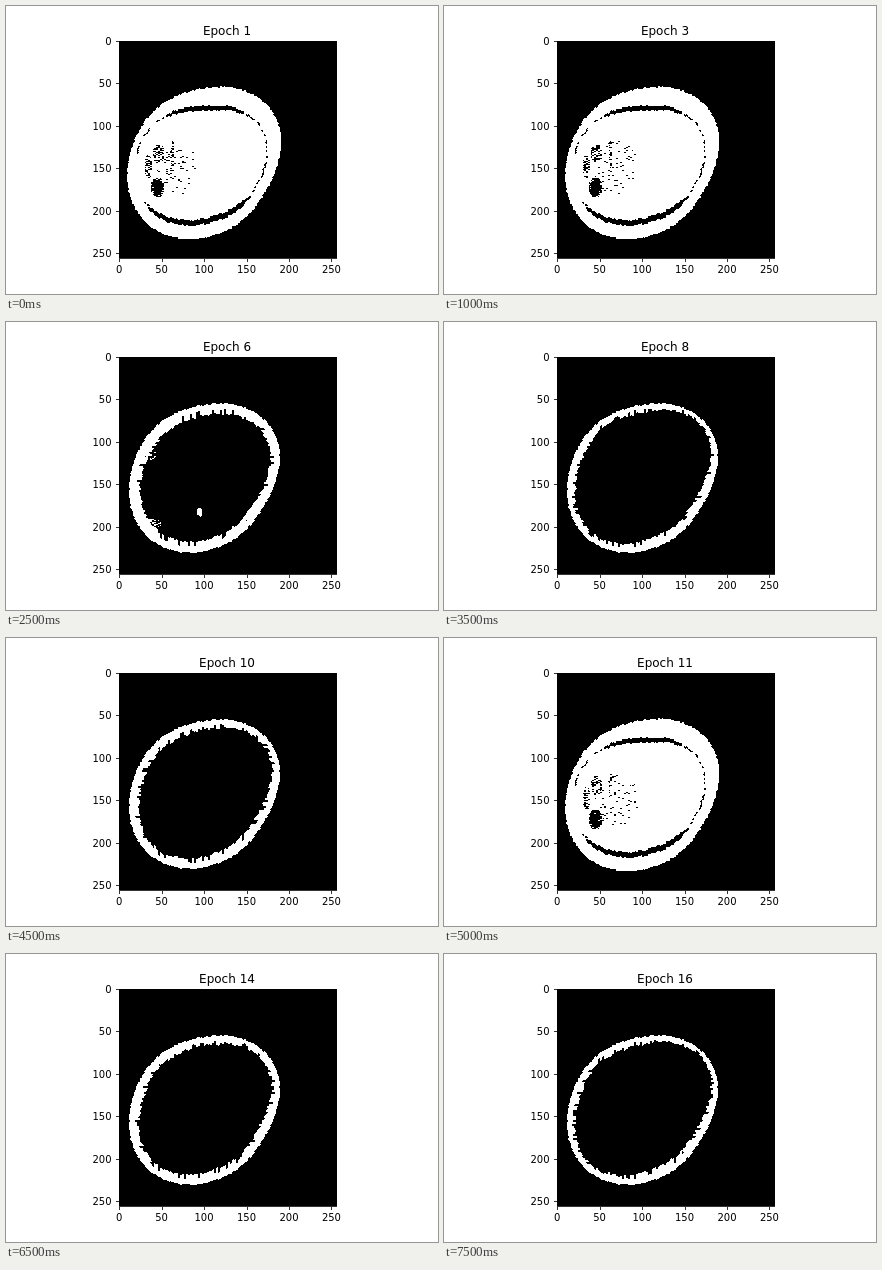
An HTML page with a canvas that plays this animation: 432 by 288 pixels, repeating every 8 s.

```html
<!DOCTYPE html>
<html lang="en">
<head>
<meta charset="utf-8">
<title>Epochs</title>
<style>
html, body { margin: 0; width: 100%; height: 100%; overflow: hidden; background: #fff; }
canvas, svg { position: absolute; left: 0; top: 0; width: 432px; height: 288px; }
text { font: 10px "DejaVu Sans", sans-serif; fill: #000; }
#title { font-size: 12px; }
</style>
</head>
<body>
<canvas id="plot" width="432" height="288"></canvas>
<svg id="labels" viewBox="0 0 432 288"><text id="title" x="221" y="29" text-anchor="middle">Epoch 1</text></svg>
<script>
const ctx = document.getElementById('plot').getContext('2d');
const svg = document.getElementById('labels');
const title = document.getElementById('title');
const { sin, cos, min, max, abs, sqrt, round, PI } = Math;

const LEFT = 113, TOP = 35, SIZE = 217, UNIT = 217.44 / 256;
const CX = 198.4, CY = 157;
const EPOCH_MS = 500, EPOCHS = 16;

// Epochs in which the whole inside is marked; the others mark only the rim.
const FILLED = new Set([1, 3, 4, 5, 7, 9, 11]);

// Speckled patches: x, y, half width, half height, density.
const DARK = [
  [151, 181, 7, 10, 0.9], [152, 147, 6, 10, 0.5], [142, 160, 4, 12, 0.4],
  [166, 148, 2, 14, 0.35], [172, 162, 22, 28, 0.07]
];
const LIGHT = [
  [142, 132, 8, 6, 0.5], [145, 201, 10, 5, 0.5], [193, 190, 3, 5, 0.8]
];

// Seeded random number for a pair of integers and a seed.
function rand(a, b, seed) {
  let h = Math.imul(a, 374761393) ^ Math.imul(b, 668265263) ^ Math.imul(seed, 2147483589);
  h = Math.imul(h ^ (h >>> 13), 1274126177);
  h = Math.imul(h ^ (h >>> 15), 739982445);
  return ((h ^ (h >>> 16)) >>> 0) / 4294967296;
}

// Tilted oval; angles run clockwise from the right.
const outline = a => 76.2 - 1.2 * (cos(a) + sin(a)) - 7.2 * sin(2 * a)
  - 1.2 * sin(3 * a) - 1.15 * cos(4 * a) - 0.5 * sin(4 * a);

// Depth and half width of the dark line inside the oval.
const lineDepth = a => 14.2 + 2.5 * cos(a) - 1.8 * sin(a) - 4.4 * cos(2 * a) - 2.75 * sin(2 * a);
const lineWeight = a => sqrt(min(1, max(0, 0.1 + 0.35 * sin(a) - cos(2 * a))));

// The rim thins and thickens in a slow wave.
const swell = epoch => epoch < 7 ? 1 : 0.5 + 0.45 * cos(PI * (epoch - 12) / 4);

function rimWidth(a, level) {
  const thin = 7.3 + 1.5 * sin(a) + 1.25 * sin(2 * a) + cos(4 * a);
  const thick = 10.3 - 0.8 * cos(a);
  return thin + (thick - thin) * level;
}

function speck(spots, x, y, seed) {
  return spots.some(([sx, sy, rx, ry, density]) => {
    const q = ((x - sx) / rx) ** 2 + ((y - sy) / ry) ** 2;
    return q < 1 && rand(x >> 1, y, sx + seed) < density * (1.2 - q * 0.5);
  });
}

function filled({ x, y, a, depth, noise }, epoch) {
  if (depth < noise(1) * 1.4 - 0.5) return false;
  const weight = lineWeight(a);
  const off = abs(depth - lineDepth(a) - (noise(2) - 0.5) * 2);
  const faint = a > 0.83 * PI && a < 1.04 * PI;
  const dotted = weight < 0.3 && noise(3) < 0.45;
  if (!faint && !dotted && off < 0.7 + 2.1 * weight) return false;
  return !speck(DARK, x, y, epoch);
}

function rim({ x, y, a, depth, noise }, epoch) {
  const level = swell(epoch);
  const d = depth - 1.6 - sin(a) - noise(1) * 1.3;
  if (d < -0.4) return false;
  const width = rimWidth(a, level) + (noise(20 + epoch) - 0.5) * 2.2;
  const nick = noise(40 + epoch) < 0.2 - 0.1 * level;
  if (d < width * (nick ? 0.6 : 1)) return true;
  return level > 0.9 && speck(LIGHT, x, y, epoch);
}

function draw(epoch) {
  ctx.fillStyle = '#000';
  ctx.fillRect(LEFT, TOP, SIZE + 1, SIZE);
  ctx.fillStyle = '#fff';
  const mark = FILLED.has(epoch) ? filled : rim;
  for (let y = 78; y < 238; y++) {
    for (let x = 118; x < 280; x++) {
      const dx = x + 0.5 - CX, dy = y + 0.5 - CY;
      const a = (Math.atan2(dy, dx) + 2 * PI) % (2 * PI);
      const flat = abs(dy) > abs(dx);
      const line = (flat ? x : y) >> 1;
      const side = flat ? (dy > 0 ? 1 : 2) : (dx > 0 ? 3 : 4);
      const spot = {
        x, y, a,
        depth: outline(a) - Math.hypot(dx, dy),
        noise: seed => rand(line, side, seed)
      };
      if (mark(spot, epoch)) ctx.fillRect(x, y, 1, 1);
    }
  }
  title.textContent = 'Epoch ' + epoch;
}

function label(value, x, y, anchor) {
  const el = document.createElementNS('http://www.w3.org/2000/svg', 'text');
  el.setAttribute('x', x);
  el.setAttribute('y', y);
  el.setAttribute('text-anchor', anchor);
  el.textContent = value;
  svg.append(el);
}

function axes() {
  ctx.fillStyle = '#333';
  ctx.fillRect(LEFT, TOP + SIZE, SIZE + 1, 1);
  for (let v = 0; v <= 250; v += 50) {
    const x = 112.68 + (v + 0.5) * UNIT, y = 34.56 + (v + 0.5) * UNIT;
    ctx.fillRect(round(x), TOP + SIZE + 1, 1, 3);
    ctx.fillRect(LEFT - 3, round(y), 3, 1);
    label(v, x, 267, 'middle');
    label(v, 105.5, round(y + 3.8), 'end');
  }
}

let shown = 0;
function tick(now) {
  const epoch = Math.floor(now / EPOCH_MS) % EPOCHS + 1;
  if (epoch !== shown) draw(shown = epoch);
  requestAnimationFrame(tick);
}

axes();
draw(shown = 1);
requestAnimationFrame(tick);
</script>
</body>
</html>
```
